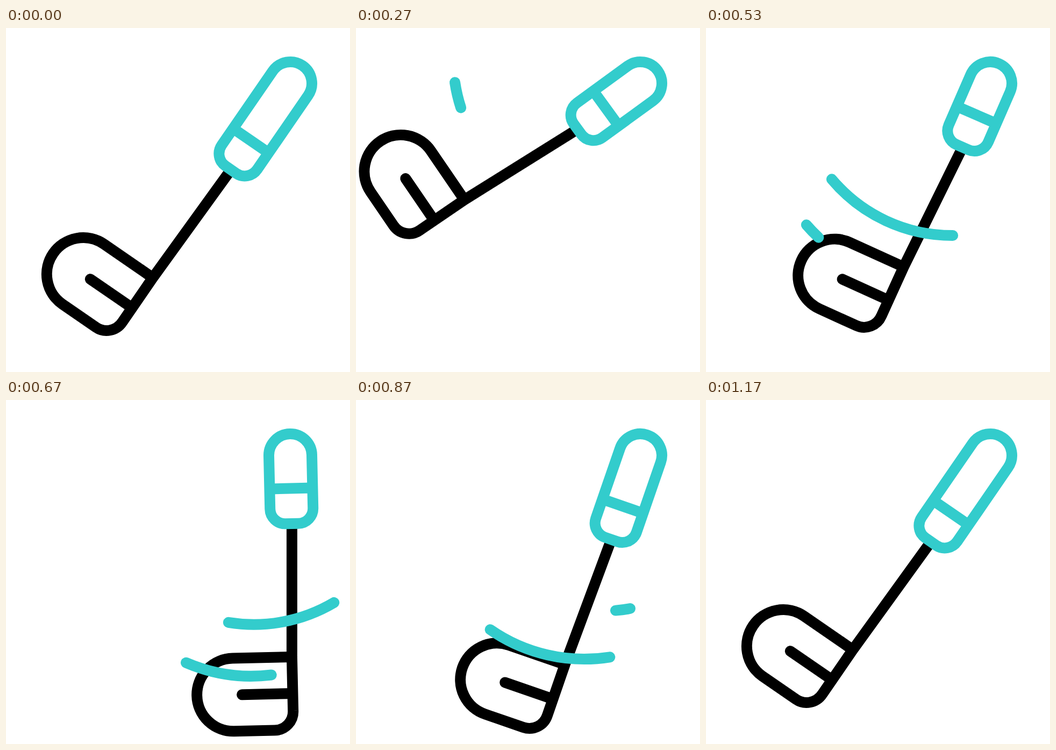
An HTML page for the animation above (1.67 s loop, 640x640 px).

```html
<!DOCTYPE html>
<html lang="en">
<head>
<meta charset="utf-8">
<title>Golf swing</title>
<style>
  html, body { margin: 0; height: 100%; overflow: hidden; background: #fff; }
  svg { display: block; width: 100%; height: 100%; }
  path { fill: none; stroke: #3cc; stroke-width: 20; }
  .ink { stroke: #000; }
  .round { stroke-linecap: round; }
</style>
</head>
<body>
<svg viewBox="0 0 640 640">
  <g id="club">
    <g id="head">
      <path id="shaft" class="ink"/>
      <path class="ink round" d="M-100 443H-6"/>
    </g>
    <path id="grip"/>
    <path class="round"/>
    <path class="round"/>
  </g>
</svg>
<script>
const LOOP = 1670, FRAME = 1000 / 30, LAST = 35, RAD = Math.PI / 180;
const [club, head, shaft, grip] = ['club', 'head', 'shaft', 'grip'].map(id => document.getElementById(id));
const trailPaths = club.querySelectorAll(':scope > .round');

// Club poses: frame, head angle, grip angle (degrees), grip extension
const poses = [[0, 34.55, 34.55, 68], [11, 60.4, 58.3, 6.3], [20, -1.3, -1.3, 0], [31, 34.55, 34.55, 68]];

// Swoosh arcs in club space; angles are measured from straight down
const trails = [
  { x: -68.4, y: 19.9, r: 293.2, from: -25.8, to: 29.3, grow: [4.2, 18.6], fade: [15.5, 28.5] },
  { x: -75, y: 102.4, r: 306.7, from: -24.6, to: 28, grow: [13.5, 25.3], fade: [23, 34.5] },
];

function ease(frame, [start, end]) {
  const x = Math.min(1, Math.max(0, (frame - start) / (end - start)));
  return x * x * (3 - 2 * x);
}

function poseAt(frame) {
  let i = 0;
  while (i < poses.length - 2 && frame > poses[i + 1][0]) i++;
  const a = poses[i], b = poses[i + 1], p = ease(frame, [a[0], b[0]]);
  return [1, 2, 3].map(n => a[n] + (b[n] - a[n]) * p);
}

function trailShape(trail, frame) {
  const { x, y, r, from, to } = trail;
  const start = ease(frame, trail.fade), end = ease(frame, trail.grow);
  if (end <= start) return '';
  const point = part => {
    const angle = (from + (to - from) * part) * RAD;
    return `${x + r * Math.sin(angle)} ${y + r * Math.cos(angle)}`;
  };
  return `M${point(start)}A${r} ${r} 0 0 0 ${point(end)}`;
}

function draw(now) {
  const frame = Math.min(LAST, Math.floor((now % LOOP + 3.4) / FRAME));
  const [angle, gripAngle, stretch] = poseAt(frame);
  const tilt = gripAngle - angle, reach = 130 + stretch;
  club.setAttribute('transform', `translate(529 103) rotate(${angle})`);
  head.setAttribute('transform', `translate(0 ${stretch})`);
  shaft.setAttribute('d',
    `M${-reach * Math.sin(tilt * RAD)} ${reach * Math.cos(tilt * RAD) - stretch}` +
    'L-5.6 375V475a35 35 0 0 1-35 35.8H-116a67.9 67.9 0 0 1 0-135.8H-5.6');
  grip.setAttribute('transform', `rotate(${tilt})`);
  grip.setAttribute('d',
    `M-40 0a40 40 0 0 1 80 0V${99 + stretch}a28 28 0 0 1-28 28h-24a28 28 0 0 1-28-28Z` +
    `M-40 ${61.5 + stretch}h80`);
  trails.forEach((trail, i) => trailPaths[i].setAttribute('d', trailShape(trail, frame)));
  requestAnimationFrame(draw);
}
draw(performance.now());
</script>
</body>
</html>
```
